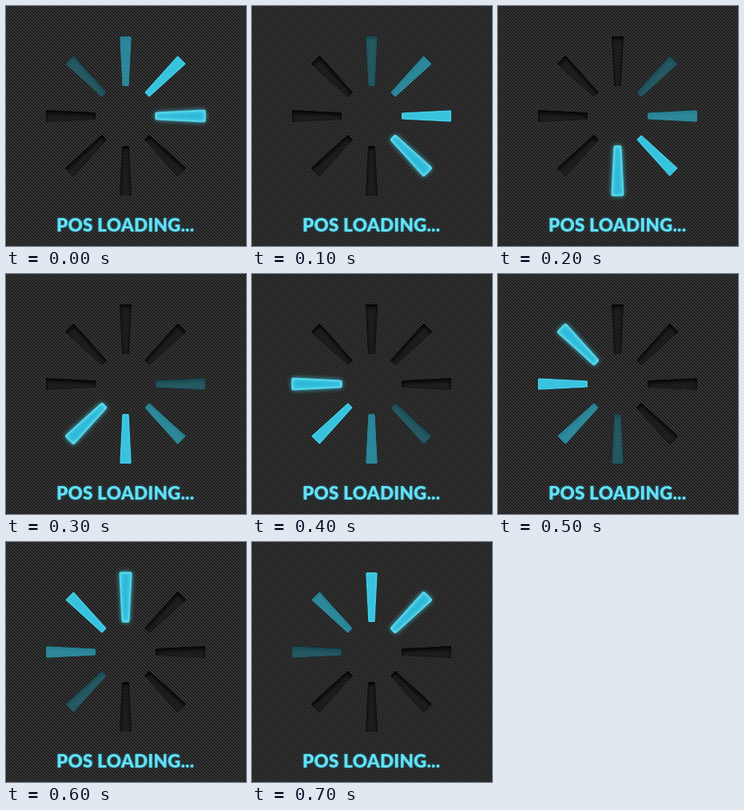
These frames come from a looping animation (300x300 px, 800 ms). An HTML page with a canvas:

```html
<!DOCTYPE html>
<html lang="en">
<head>
<meta charset="utf-8">
<title>Loading</title>
<style>
  html, body { margin: 0; width: 100%; height: 100%; overflow: hidden; background: #272727; }
  canvas, svg { position: absolute; left: 0; top: 0; width: 300px; height: 300px; }
  text {
    font: 900 22.5px Lato, sans-serif;
    letter-spacing: .2px;
    fill: #62e0f4;
    text-shadow: 0 0 3px rgba(30, 150, 180, .7);
  }
</style>
</head>
<body>
<canvas id="stage" width="300" height="300"></canvas>
<svg viewBox="0 0 300 300"><text x="63" y="282">POS LOADING...</text></svg>
<script>
const ctx = document.getElementById('stage').getContext('2d');
const BARS = 8, STEP = 100;
const LEVELS = [1, 1, 0.65, 0.36]; // opacity from the head backwards

// Tapered bar pointing right from the centre
const bar = new Path2D();
bar.moveTo(39, -4.3);
bar.lineTo(98, -7.3);
bar.quadraticCurveTo(99.5, -7.3, 99.5, -6);
bar.lineTo(99.5, 6);
bar.quadraticCurveTo(99.5, 7.3, 98, 7.3);
bar.lineTo(39, 4.3);
bar.quadraticCurveTo(37.5, 4.2, 37.5, 3);
bar.lineTo(37.5, -3);
bar.quadraticCurveTo(37.5, -4.2, 39, -4.3);
bar.closePath();

const outside = new Path2D();
outside.rect(-400, -400, 800, 800);
outside.addPath(bar);

function makeStripes() {
  const tile = document.createElement('canvas');
  tile.width = tile.height = 4;
  const t = tile.getContext('2d');
  ['#3c3c3c', '#292929', '#1c1c1c', '#262626'].forEach((color, i) => {
    t.fillStyle = color;
    for (let y = 0; y < 4; y++) t.fillRect((y + i) % 4, y, 1, 1);
  });
  return ctx.createPattern(tile, 'repeat');
}
const stripes = makeStripes();

function setShadow(color, blur, dy = 0) {
  ctx.shadowColor = color;
  ctx.shadowBlur = blur;
  ctx.shadowOffsetY = dy;
}

function innerShadow(color, blur, dy) {
  ctx.save();
  ctx.clip(bar);
  setShadow(color, blur, dy);
  ctx.fillStyle = '#000';
  ctx.fill(outside, 'evenodd');
  ctx.restore();
}

function drawBar(index, age) {
  ctx.save();
  ctx.translate(149.5, 137.5);
  ctx.rotate(index * 2 * Math.PI / BARS);

  ctx.fillStyle = 'rgba(0,0,0,.28)';
  ctx.fill(bar);
  innerShadow('rgba(0,0,0,.95)', 5, 3);

  if (age < LEVELS.length) {
    const head = age === 0;
    ctx.globalAlpha = LEVELS[age];
    ctx.fillStyle = head ? '#2fb9d9' : '#38c2de';
    if (head) setShadow('#45dcf5', 6);
    ctx.fill(bar);
    setShadow('transparent', 0);
    if (age < 2) innerShadow(head ? '#7cf2ff' : '#62e2f5', head ? 5 : 3, 0);
    if (head) {
      ctx.strokeStyle = 'rgba(100,232,250,.75)';
      ctx.lineWidth = 1.5;
      ctx.stroke(bar);
    }
  }
  ctx.restore();
}

function draw(now) {
  const step = Math.floor(now / STEP) % BARS;
  ctx.fillStyle = stripes;
  ctx.fillRect(0, 0, 300, 300);
  for (let i = 0; i < BARS; i++) drawBar(i, (step - i + BARS) % BARS);
}

let start;
function frame(now) {
  start ??= now;
  draw(now - start);
  requestAnimationFrame(frame);
}
draw(0);
requestAnimationFrame(frame);
</script>
</body>
</html>
```
